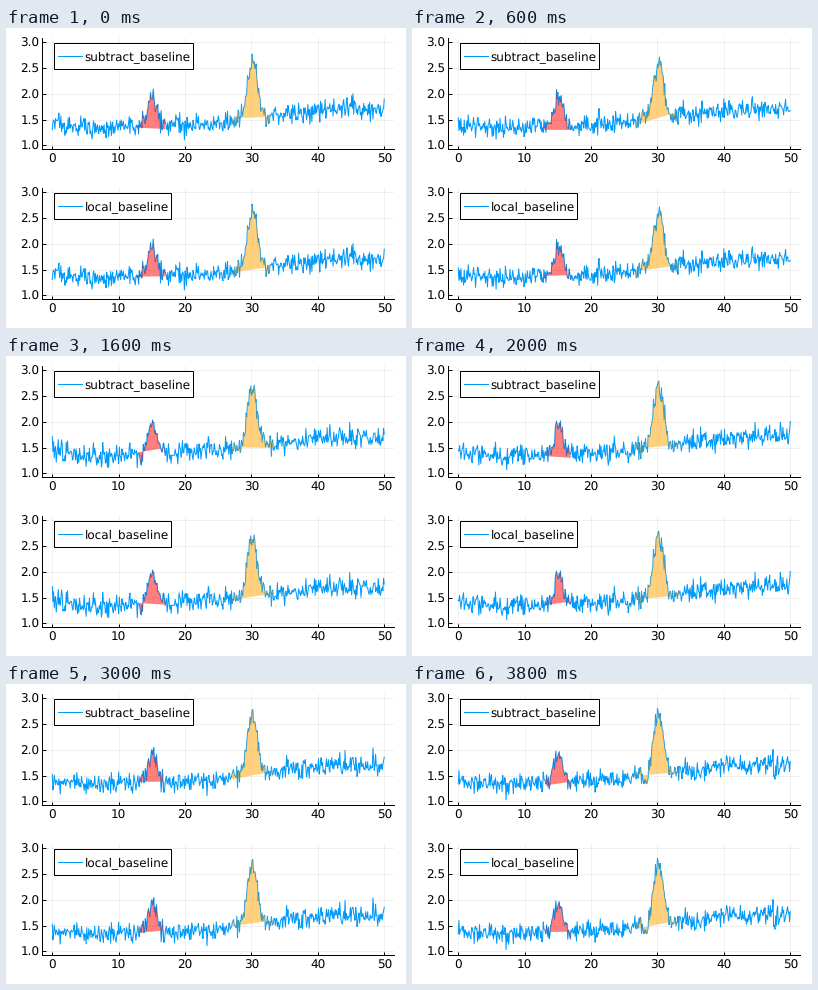
Recreate the animation shown at these times as a matplotlib script. Size 400x300 px, loop 4 s.

```python
import numpy as np
import matplotlib.pyplot as plt
from matplotlib.animation import FuncAnimation
from matplotlib.patches import Rectangle

W, H, PX = 400, 300, 0.72          # PX: points per pixel at 100 dpi
N_FRAMES, STEP = 20, 200
BLUE = "#009afa"
FONT = dict(family="DejaVu Sans", size=12 * PX)
plt.rcParams["text.hinting"] = "no_hinting"

x = np.linspace(0, 50, 501)
trend = np.interp(x, [0, 6.5, 10, 20, 28, 43, 50],
                  [1.42, 1.31, 1.36, 1.39, 1.48, 1.72, 1.70])


def bump(center, width, height):
    return height * np.exp(-0.5 * ((x - center) / width) ** 2)


clean = trend + bump(15.1, 0.62, 0.58) + bump(30.15, 0.75, 1.15)


def fit(rng, start, end):
    """Integration range, then baseline ends for the two methods."""
    a, b = np.array([start, end]) + rng.uniform(-0.3, 0.3, 2)
    level = np.interp([a, b], x, trend)
    return a, b, level + rng.normal(0, 0.06, 2), level + rng.normal(0, 0.02, 2)


def area(y, a, b, ends):
    inside = (x >= a) & (x <= b)
    curve = np.column_stack([x[inside], y[inside]])
    return np.vstack([[a, ends[0]], curve, [b, ends[1]]])


fig = plt.figure(figsize=(W / 100, H / 100), dpi=100, facecolor="white")


def panel(top):
    left, right, height = 36.3, 388.2, 111
    ax = fig.add_axes([left / W, 1 - (top + height) / H, (right - left) / W, height / H])
    ax.set(xlim=(-1.5, 51.5), ylim=(1 - 4 / 51.5, 3 + 4 / 51.5),
           xticks=range(0, 51, 10), yticks=np.arange(1, 3.1, 0.5))
    ax.spines[["top", "right"]].set_visible(False)
    ax.spines[["left", "bottom"]].set_linewidth(PX)
    ax.tick_params(direction="in", length=3.5 * PX, width=PX)
    ax.tick_params(axis="x", pad=4 * PX)
    ax.tick_params(axis="y", pad=3 * PX)
    ax.grid(color="black", alpha=0.06, lw=PX)
    ax.set_axisbelow(True)
    for label in ax.get_xticklabels() + ax.get_yticklabels():
        label.set(**FONT)
    line, = ax.plot([], [], color=BLUE, lw=PX, zorder=2)
    fills = [ax.fill([0, 0, 0], [2, 2, 2], color=c, alpha=0.5, lw=0, zorder=3)[0]
             for c in ("red", "orange")]
    return line, fills


panels = [panel(10.3), panel(160.3)]

overlay = fig.add_axes([0, 0, 1, 1], zorder=5)
overlay.set(xlim=(0, W), ylim=(H, 0))
overlay.axis("off")


def legend(y, width, text):
    overlay.add_patch(Rectangle((48, y), width, 26, fc="white", ec="black", lw=PX))
    overlay.plot([52, 76], [y + 13, y + 13], color=BLUE, lw=PX, zorder=2)
    overlay.text(78.7, y + 17.4, text, va="baseline", **FONT)


legend(15, 139, "subtract_baseline")
legend(165, 117, "local_baseline")


def draw(k):
    rng = np.random.default_rng(100 + k)
    y = clean + rng.normal(0, 0.1, x.size)
    fits = fit(rng, 13.1, 17.0), fit(rng, 26.9, 33.3)
    for row, (line, fills) in enumerate(panels):
        line.set_data(x, y)
        for poly, (a, b, *ends) in zip(fills, fits):
            poly.set_xy(area(y, a, b, ends[row]))
    return [artist for line, fills in panels for artist in (line, *fills)]


anim = FuncAnimation(fig, draw, frames=N_FRAMES, interval=STEP, repeat=True, repeat_delay=0)
plt.show()
```
